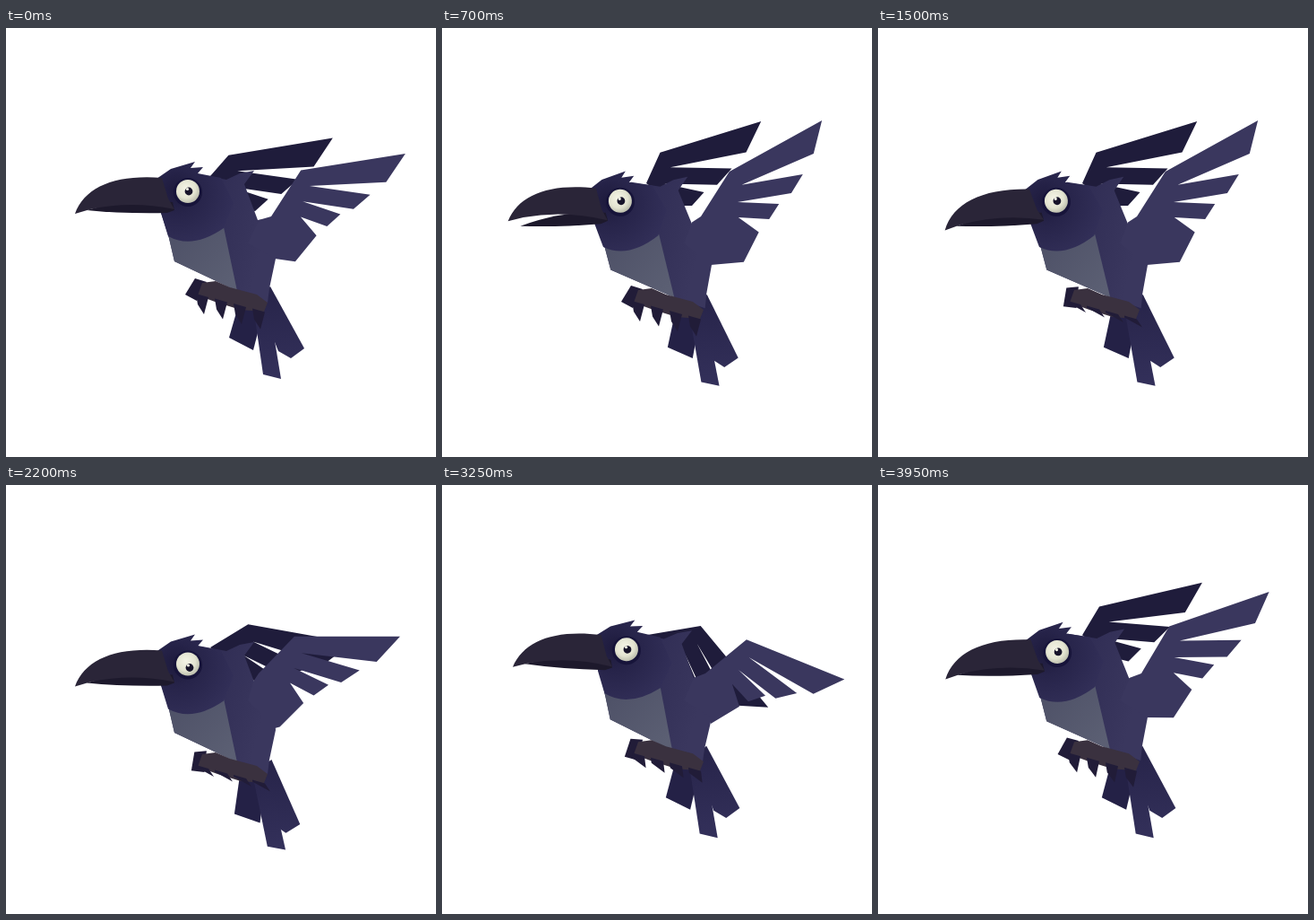
Animation, 480 px wide and 478 px high, one loop 4000 ms. Source, as an HTML page:

```html
<!DOCTYPE html>
<html lang="en">
<head>
<meta charset="utf-8">
<title>Flying raven</title>
<style>
html, body { margin: 0; width: 100%; height: 100%; overflow: hidden; background: #fff; }
svg { display: block; width: 480px; height: 478px; }
</style>
</head>
<body>
<svg viewBox="0 0 480 478">
  <defs>
    <linearGradient id="coat" gradientUnits="userSpaceOnUse" x1="180" y1="200" x2="290" y2="230">
      <stop offset="0" stop-color="#2a274f"/><stop offset=".75" stop-color="#36335a"/><stop offset="1" stop-color="#3a375e"/>
    </linearGradient>
    <radialGradient id="face" gradientUnits="userSpaceOnUse" cx="190" cy="182" r="72">
      <stop offset="0" stop-color="#1d1a3c"/><stop offset=".35" stop-color="#27244a"/><stop offset="1" stop-color="#34315a"/>
    </radialGradient>
    <linearGradient id="bib" gradientUnits="userSpaceOnUse" x1="190" y1="232" x2="250" y2="285">
      <stop offset="0" stop-color="#4f5268"/><stop offset="1" stop-color="#5b5f73"/>
    </linearGradient>
    <linearGradient id="plume" gradientUnits="userSpaceOnUse" x1="285" y1="300" x2="295" y2="390">
      <stop offset="0" stop-color="#28254b"/><stop offset="1" stop-color="#33305a"/>
    </linearGradient>
    <radialGradient id="white" cx=".42" cy=".38" r=".62">
      <stop offset="0" stop-color="#f4f4e6"/><stop offset=".65" stop-color="#e3e4d1"/><stop offset="1" stop-color="#bdbfae"/>
    </radialGradient>
  </defs>
  <polygon id="farWing" fill="#1f1c3b"/>
  <g id="tail">
    <polygon fill="#242146" points="262,300 249,345 276,359 290,305"/>
    <polygon fill="url(#plume)" points="295,288 333,357 318,368 304,360 280,300"/>
    <polygon fill="url(#plume)" points="276,310 287,386 307,391 292,300"/>
  </g>
  <g id="torso">
    <polygon fill="url(#coat)" points="175,168 173,206 182,234 188,260 258,293 292,306 294,290 301,257 297,212 281,214 266,174 277,159 261,162 246,169 214,163"/>
    <polygon fill="url(#bib)" points="180,226 188,260 258,293 243,222"/>
  </g>
  <g id="feet" fill="#211c38">
    <polygon id="heel" points="211,279 224,283 213,304 200,297"/>
    <polygon fill="#3a313f" points="219,284 234,282 250,289 280,297 292,306 288,316 262,314 236,306 214,298"/>
    <path id="toes"/>
  </g>
  <g id="head">
    <path fill="url(#face)" d="M168 168L184 157L211 149L206 156L220 155L214 162L240 167L254 195L243 223Q208 247 181 232L173 206Z"/>
    <path fill="#1d192c" d="M90 203Q138 188 186 194L188 203L180 206Q130 207 90 203Z"/>
    <path id="beak" fill="#2a2538" d="M77 207C88 177 122 163 174 167L181 190L188 202Q140 192 94 202Z"/>
    <circle cx="203" cy="183" r="16" fill="#17143a"/>
    <circle cx="203" cy="182" r="13" fill="url(#white)"/>
    <g id="pupil">
      <circle cx="204" cy="182" r="4.4" fill="#17142a"/>
      <circle cx="202.5" cy="179.5" r="1.6" fill="#f4f4e6"/>
    </g>
  </g>
  <polygon id="wing" fill="#3a375e"/>
</svg>
<script>
const LOOP = 4000, STEP = 50, BEAT = 400;
const { PI, sin, cos, min, max } = Math;
const el = id => document.getElementById(id);
const move = (node, t) => node.setAttribute('transform', t);
const draw = (id, pts) => el(id).setAttribute('points', pts.map(p => p.map(v => v.toFixed(1))).join(' '));

// Point at a distance and an angle in degrees from another point.
const polar = ([x, y], deg, r) => [x + r * cos(deg * PI / 180), y + r * sin(deg * PI / 180)];

// Periodic curve of two harmonics.
const wave = (f, mean, c1, s1, c2, s2) =>
  mean + c1 * cos(f) + s1 * sin(f) + c2 * cos(2 * f) + s2 * sin(2 * f);

// 0 outside a span of time, 1 inside, with ramps at both ends.
const span = (t, from, to, ramp) => max(0, min(1, (t - from) / ramp, (to - t) / ramp));

const feathers = [
  { length: 118, cut: 96, gap: 20, turn: 76 },
  { length: 82, cut: 73, gap: 35, turn: 104 },
  { length: 66, cut: 69, gap: 52, turn: 108 },
  { length: 75, cut: 102 }
];

// Feathers fan out from the elbow and close as the wing swings down.
function fan(elbow, angle, count) {
  const spread = 1 - (angle + 29) / 250;
  const pts = [elbow];
  feathers.slice(0, count).forEach((f, i) => {
    const a = angle + 31 * i * spread;
    pts.push(polar(elbow, a, f.length), polar(elbow, a + 17, f.cut));
    if (i < count - 1) pts.push(polar(elbow, angle + f.turn * spread, f.gap));
  });
  return pts;
}

function drawWings(f, sink) {
  const dy = 16 * sink;
  const elbow = polar([280, 215 + dy], wave(f, -47.5, 3.5, 14.5, -5, -2.2), 75);
  draw('wing', [
    [270, 240], [282 - 6 * sink, 214 + 5 * sink], [296 - 14 * sink, 210],
    ...fan(elbow, wave(f, 4.7, -4.5, 42.9, -9.2, -9.85), 4),
    [300, 257 + 14 * sink]
  ]);

  const farElbow = polar([265, 190 + dy], wave(f, -73, -12.5, 60.5, -23.5, -17), 51 - 12 * sin(f));
  draw('farWing', [
    [228, 165 + dy],
    ...fan(farElbow, wave(f, 25.4, -9.75, 67.5, -25, -16), 3),
    [262, 190 + dy]
  ]);
}

function drawFeet(clench) {
  let d = '';
  for (let i = 0; i < 4; i++)
    d += `M${212 + 21 * i} ${296 + 5.5 * i}l14 4l${-5 + 11 * clench} ${19 - 10 * clench}l${-7 - 13 * clench} -11z`;
  el('toes').setAttribute('d', d);
  move(el('heel'), `rotate(${-22 * clench} 217 282)`);
}

function frame() {
  const t = Math.floor(performance.now() % LOOP / STEP) * STEP;
  const f = 2 * PI * t / BEAT;
  const sink = (1 - cos(f)) / 2, nod = 3.5 * sin(f);

  drawWings(f, sink);
  drawFeet(max(span(t, 900, 2600, 350), span(t, 2950, 4000, 500)));
  move(el('feet'), `translate(0 ${16 * sink})`);
  [-8, 5, -3.4].forEach((turn, i) =>
    move(el('tail').children[i], `translate(0 ${17 * sink}) rotate(${turn * sink} 284 305)`));

  move(el('torso'), `translate(0 ${16 * sink}) rotate(${nod / 2} 235 250)`);
  move(el('head'), `translate(0 ${17.5 * sink}) rotate(${nod} 235 250)`);
  move(el('beak'), `rotate(${5.5 * span(t, 600, 900, 100)} 183 198)`);
  const look = span(t, 1900, 2500, 200);
  move(el('pupil'), `translate(${look} ${4 * look})`);
  requestAnimationFrame(frame);
}
frame();
</script>
</body>
</html>
```
